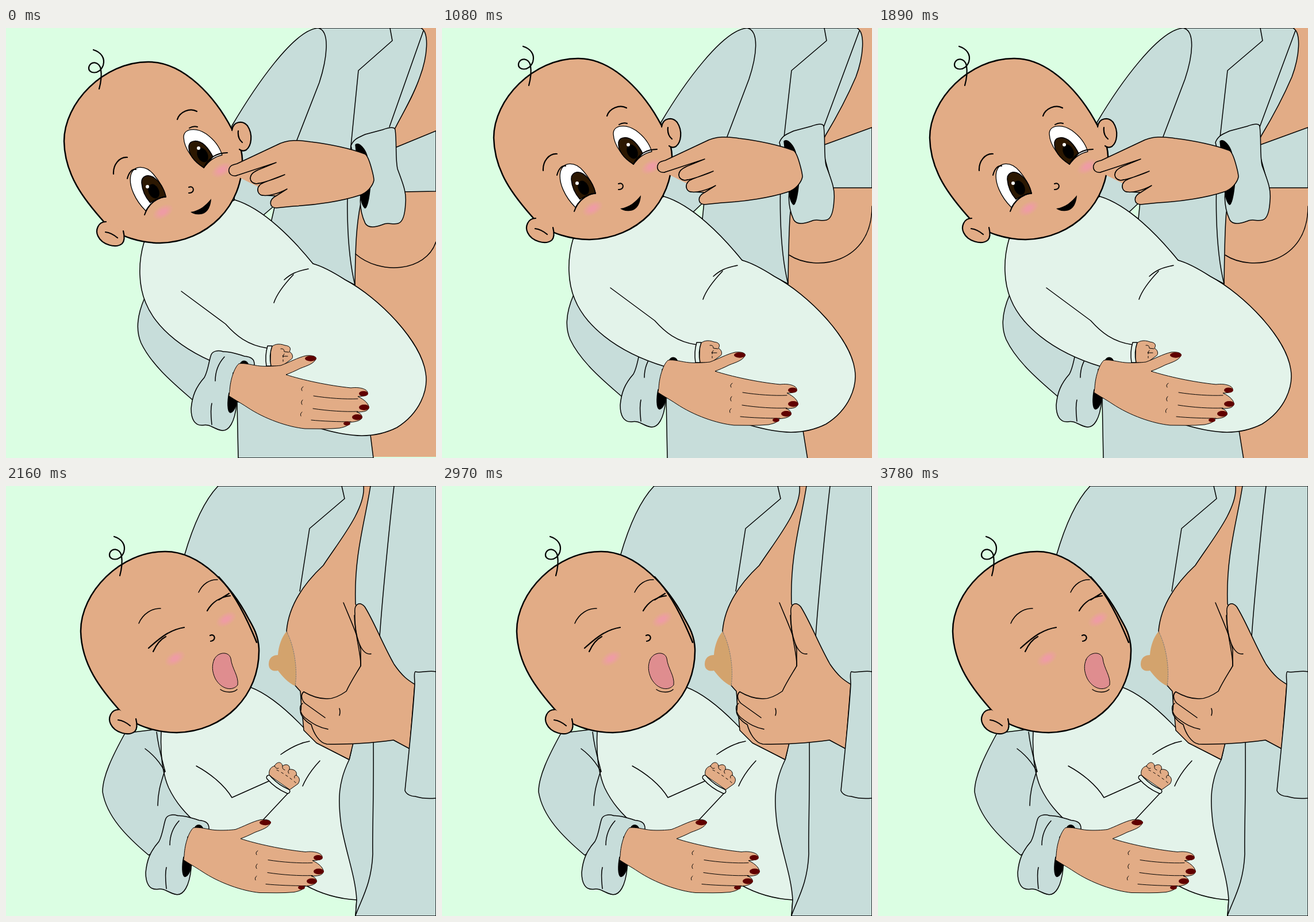
An HTML page for the animation above (4050 ms loop, 748 by 748 pixels).

```html
<!DOCTYPE html>
<html lang="en">
<head>
<meta charset="utf-8">
<style>
  html, body { margin: 0; width: 100%; height: 100%; overflow: hidden; background: #dbfee3; }
  svg { display: block; width: 100vw; height: 100vh; fill: none; stroke: #000; stroke-width: 1.5; stroke-linecap: round; stroke-linejoin: round; }
  .skin { fill: #e2ac86; }
  .coat { fill: #c7ddda; }
  .suit { fill: #e3f3ea; }
  .mint { fill: #dbfee3; }
  .ink { fill: #000; }
  .bare { stroke: none; }
  .bold { stroke-width: 2.5; }
  .fine { stroke-width: 1; }
  .nails { fill: #600000; stroke: none; }
</style>
</head>
<body>
<svg viewBox="0 0 748 748">
  <defs>
    <radialGradient id="blush">
      <stop offset=".25" stop-color="#ee9ca4"/>
      <stop offset="1" stop-color="#ee9ca4" stop-opacity="0"/>
    </radialGradient>
    <ellipse id="cheek" rx="20" ry="11.5" transform="rotate(-30)" fill="url(#blush)" stroke="none"/>

    <path id="skull" class="skin bold" d="M393 176C365 122 310 58 247 59C170 59 101 130 101 197C102 255 135 298 172 339C195 365 240 374 268 374C350 372 413 310 411 228C410 205 401 190 393 176Z"/>
    <path id="curl" stroke-width="2.2" d="M152 38C165 42 173 52 169 65C163 82 143 80 144 69C146 56 163 58 165 72C167 85 165 95 162 106"/>
    <g id="ear" class="skin" stroke-width="2.2">
      <path d="M174 337C160 337 155 352 160 362C167 377 191 384 202 375C207 370 206 361 204 353"/>
      <path d="M173 355C182 356 188 360 194 365"/>
    </g>

    <g id="awake">
      <use href="#skull"/><use href="#curl"/><use href="#ear"/>
      <g stroke-width="2.2">
        <path class="skin" d="M393 178C395 162 412 160 420 170C430 185 427 205 418 212C413 215 408 213 406 211"/>
        <path d="M404 179C403 188 406 195 411 199M187 254C186 238 197 224 211 225M298 159C302 146 320 138 332 145"/>
      </g>
      <use href="#cheek" x="273" y="320"/><use href="#cheek" x="375" y="247"/>
      <g fill="#fff" stroke-width="1.3">
        <path d="M243 318C225 300 213 275 217 256C222 238 243 238 257 255C268 268 275 280 278 293C262 297 250 305 243 318Z"/>
        <path d="M309 190C309 175 330 172 348 184C362 194 372 208 376 221C362 224 352 232 344 243C328 232 310 212 309 190Z"/>
      </g>
      <g fill="#2c1802">
        <path d="M236 270C235 258 246 253 257 260C268 268 275 280 278 293C268 295 258 299 251 304C243 295 237 283 236 270Z"/>
        <path d="M318 205C320 194 335 194 346 204C354 212 358 220 360 224L344 243C328 233 317 220 318 205Z"/>
      </g>
      <g class="ink bare">
        <ellipse cx="257" cy="284" rx="9" ry="13" transform="rotate(-25 257 284)"/>
        <ellipse cx="342" cy="221" rx="9" ry="13" transform="rotate(-25 342 221)"/>
      </g>
      <g fill="#fff" stroke="none"><circle cx="246" cy="276" r="3"/><circle cx="335" cy="209" r="3"/></g>
      <path stroke-width="2" d="M211 262C214 250 220 245 226 246M241 325C248 305 265 293 278 294M319 174Q326 170 333 172M344 243C352 225 368 217 385 217M318 277C328 273 329 288 318 287"/>
      <path class="ink bare" d="M321 320C337 318 348 308 357 297C356 312 350 323 338 324C330 325 325 323 321 320Z"/>
    </g>

    <g id="asleep">
      <use href="#skull" x="29" y="55"/><use href="#curl" x="36" y="50"/><use href="#ear" x="22" y="52"/>
      <path class="bold" d="M370 158C397 186 419 230 436 272"/>
      <use href="#cheek" x="294" y="300"/><use href="#cheek" x="383" y="232"/>
      <path d="M231 239C238 222 255 212 269 213M335 185C342 170 355 162 368 163"/>
      <path stroke-width="2.2" d="M248 282C268 264 285 250 310 246M256 288C262 275 270 266 278 262M350 217C358 203 372 193 390 191M370 198L388 187M355 260C364 256 366 269 356 270"/>
      <path class="fine" fill="#df8d8f" d="M362 302C368 288 388 287 391 300C393 318 405 330 403 346C395 357 375 355 364 335C358 322 358 312 362 302Z"/>
      <path d="M373 354C382 360 395 360 402 354"/>
    </g>

    <g id="cuff">
      <path class="coat" d="M432 587C433 575 425 572 415 571C405 568 390 562 378 563C368 560 360 562 357 568C353 578 352 595 345 608C330 625 324 640 322 662C322 680 328 692 342 691C355 688 362 698 375 700C388 702 398 685 401 655L395 600Z"/>
      <path d="M380 572C368 585 364 600 364 614M358 653C355 665 357 680 358 690"/>
    </g>
    <g id="palm">
      <path class="ink" d="M388 635C385 650 385 667 390 669C396 668 400 658 402 648ZM408 583C412 577 420 578 422 587Z"/>
      <path class="skin fine" d="M389 632C390 610 398 590 405 584C415 582 430 587 442 588C455 589 470 588 478 587C492 582 508 573 522 570C532 569 541 571 539 576C535 584 525 587 512 592C502 597 495 600 487 603C515 612 560 622 600 626C615 624 628 628 629 634C628 640 620 641 612 641C625 647 632 655 631 661C629 667 622 668 610 668C618 670 621 676 618 680C612 685 605 685 597 686C598 691 590 694 580 696C560 698 540 697 520 697C490 694 450 680 420 660C408 652 395 645 388 640Z"/>
      <path class="fine" d="M535 640C560 644 590 646 612 645M534 662C560 666 590 668 612 667M531 682C550 684 580 685 600 685M517 624q-5 3-2 7M516 647q-4 4-1 8M515 668q-4 3-2 7"/>
      <g class="nails">
        <ellipse cx="530" cy="575" rx="10" ry="4.7"/><ellipse cx="622" cy="636" rx="8" ry="4.5"/>
        <ellipse cx="623" cy="660" rx="9" ry="5"/><ellipse cx="611" cy="677" rx="9" ry="5"/><ellipse cx="593" cy="688" rx="6" ry="3.5"/>
      </g>
    </g>

    <path id="arm" class="coat" d="M300 470H241C228 500 225 525 235 548C255 590 300 625 328 650L390 600"/>
    <g id="bundle">
      <path class="suit" d="M240 373C229 410 231 450 243 478C260 520 310 568 400 595L548 697C600 712 640 715 680 695C720 670 735 630 730 600C722 545 650 470 590 438C565 422 545 413 534 410C500 368 448 314 398 299Z"/>
      <path d="M305 458L382 515C400 535 420 552 455 557M526 419C505 423 495 428 484 438M500 429C482 448 471 463 466 478"/>
      <path class="skin fine" d="M461 556C465 550 475 548 485 552C495 553 496 558 493 563C500 567 500 575 495 577L480 588H460Z"/>
      <path class="fine" d="M478 558q6-1 6 5l8 1M484 567l-3 4h9"/>
      <path class="fine" stroke-dasharray="3 4" d="M482 570V584"/>
      <path class="suit" d="M455 553H463Q457 570 461 588H453Q450 570 455 553Z"/>
    </g>
    <g id="touch">
      <path class="coat" d="M600 205C605 192 615 190 625 185L655 177C668 172 676 172 677 177C680 200 677 225 681 245C690 270 697 285 695 305C694 325 690 338 682 340C672 343 665 337 655 342C642 347 630 348 625 340C618 325 614 305 618 282Z"/>
      <path class="ink" d="M608 203C615 198 625 212 628 222L634 270C632 300 627 315 624 313C617 305 616 290 616 280Z"/>
      <path class="skin" d="M388 245C390 238 396 238 402 236L470 204C490 193 510 195 530 198C570 203 605 212 624 219C632 222 640 260 640 265C638 275 628 287 615 291C585 301 540 308 500 310L470 313C458 313 456 299 470 292L446 291C436 290 434 274 448 269L435 271C424 270 418 256 438 247L400 257C393 258 386 254 388 245Z"/>
      <path class="skin" d="M400 257L470 234L438 247C418 256 424 270 435 271C445 270 470 262 485 255L448 269C434 274 436 290 446 291C455 293 475 288 489 280L470 292"/>
    </g>
  </defs>

  <g class="scene">
    <path class="skin bare" d="M600 0H748V746H600Z"/>
    <path class="coat" d="M393 170C432 104 500 3 543 0H722C737 8 733 50 720 85C708 120 690 148 675 178L617 305C608 350 608 390 607 447L534 410L398 320Z"/>
    <path d="M543 0C565 5 558 55 545 95L506 195M668 0L672 22L613 74L600 205C590 285 592 385 607 447M726 5L667 172"/>
    <path class="mint" d="M468 308L446 327L461 338Z"/>
    <path class="coat" d="M670 211L748 179V284L690 285Z"/>
    <path d="M608 393C650 430 730 425 748 372"/>
    <path class="coat" d="M402 650L404 748H639L633 700Z"/>
    <use href="#arm"/><use href="#bundle"/><use href="#awake"/><use href="#touch"/><use href="#cuff"/><use href="#palm"/>
  </g>

  <g class="scene">
    <path class="skin bare" d="M600 0H748V748H600Z"/>
    <path class="coat" d="M381 164C420 98 488 3 531 0H722C737 8 733 50 720 85C705 120 685 157 667 187L606 320C603 350 603 390 602 445L522 404L386 314Z"/>
    <path d="M531 0C553 5 547 50 534 89L496 189M665 0L669 22L608 74L595 190C584 280 587 385 602 445M726 5L664 172"/>
    <path class="mint" d="M456 302L437 320L453 332Z"/>
    <path class="coat" d="M660 205L748 173V278H680Z"/>
    <path d="M604 395C650 425 748 410 748 310"/>
    <path class="coat" d="M390 643L392 750H636L627 694Z"/>
    <g transform="translate(-12 -6)">
      <use href="#arm"/><use href="#cuff"/><use href="#bundle"/><use href="#awake" x="1"/><use href="#touch" x="-1"/><use href="#palm"/>
    </g>
  </g>

  <g class="scene">
    <path class="coat" d="M310 122C325 70 345 25 369 0H748V748H608L610 720L560 500L400 380Z"/>
    <path class="coat" d="M207 430C185 470 168 505 168 532C175 575 210 610 248 642L340 600L290 420Z"/>
    <path class="suit" d="M270 427C268 470 272 500 283 525C295 550 310 568 340 595L520 694C545 708 575 718 610 720L640 600L597 476L542 447C510 410 465 365 425 350Z"/>
    <path d="M262 428C265 455 270 470 277 497M242 457C260 470 270 485 276 496C268 520 264 535 264 556M331 487C355 500 380 520 393 542L458 513M490 535L446 582M478 467C495 455 510 447 528 444M546 478C530 495 522 508 516 522"/>
    <path class="coat" d="M604 447L597 476C578 515 577 545 583 590C592 640 608 680 610 720L608 748H748V447Z"/>
    <path class="coat bare" d="M600 430H747V460H600Z"/>
    <path d="M639 440C640 550 637 600 638 640C636 690 620 715 608 747M584 0L589 22L528 74L511 183M675 0C668 60 655 190 650 262"/>
    <path class="skin" d="M622 0C626 40 580 95 552 138C520 168 492 205 488 252L503 347L512 357L518 425L540 447L597 476L604 447L650 300L608 205C605 120 625 60 634 0Z"/>
    <path fill="#d3a36d" stroke="none" d="M488 253C500 275 508 315 503 348C490 342 480 330 473 321C465 323 457 320 457 310C457 298 465 294 473 294C474 278 480 262 488 253Z"/>
    <path class="fine" stroke="#777" stroke-dasharray="2 2" d="M488 253C500 275 508 315 503 348"/>
    <path class="skin" d="M607 222C605 205 615 200 624 210C640 235 655 275 675 310C690 332 700 338 711 345L702 457L674 442C640 447 590 450 558 449C545 447 535 430 531 415C518 408 510 395 513 390C515 380 510 365 518 358C530 365 545 370 557 370C570 371 585 362 592 357C600 340 610 325 617 313C618 290 605 255 607 222Z"/>
    <path d="M587 203C600 235 612 260 617 285V313M606 225C607 255 615 295 635 292M518 358C512 362 514 372 520 378L555 403M516 378C508 384 512 396 520 403C535 415 545 420 560 423M580 387q2 6 0 12"/>
    <path class="coat" d="M748 323C735 320 720 326 712 323C709 325 711 335 711 345C708 400 700 470 694 530C697 537 705 540 712 540C725 544 738 544 748 543Z"/>
    <use href="#asleep"/>
    <path class="skin fine" d="M458 503C456 492 463 488 467 487C472 478 480 480 481 487C488 482 495 486 493 493C500 492 507 496 505 503C511 507 512 512 508 518L494 528Z"/>
    <path class="fine" d="M467 487q3 6 7 4M481 487q-1 6 4 7M493 493q-4 3-1 7M505 503q-5 1-3 5"/>
    <path class="fine" stroke-dasharray="4 5" d="M471 494C480 498 495 508 505 517"/>
    <path stroke-width="9" d="M457 507Q471 523 490 531"/>
    <path stroke="#e3f3ea" stroke-width="6" d="M457 507Q471 523 490 531"/>
    <g transform="translate(-79 10.5)"><use href="#cuff"/><use href="#palm"/></g>
  </g>
</svg>
<script>
  const POSE_MS = 270;
  const scenes = document.querySelectorAll('.scene');

  function draw() {
    const current = Math.floor(performance.now() / POSE_MS) % scenes.length;
    scenes.forEach((scene, i) => { scene.style.display = i === current ? '' : 'none'; });
    requestAnimationFrame(draw);
  }
  draw();
</script>
</body>
</html>
```
